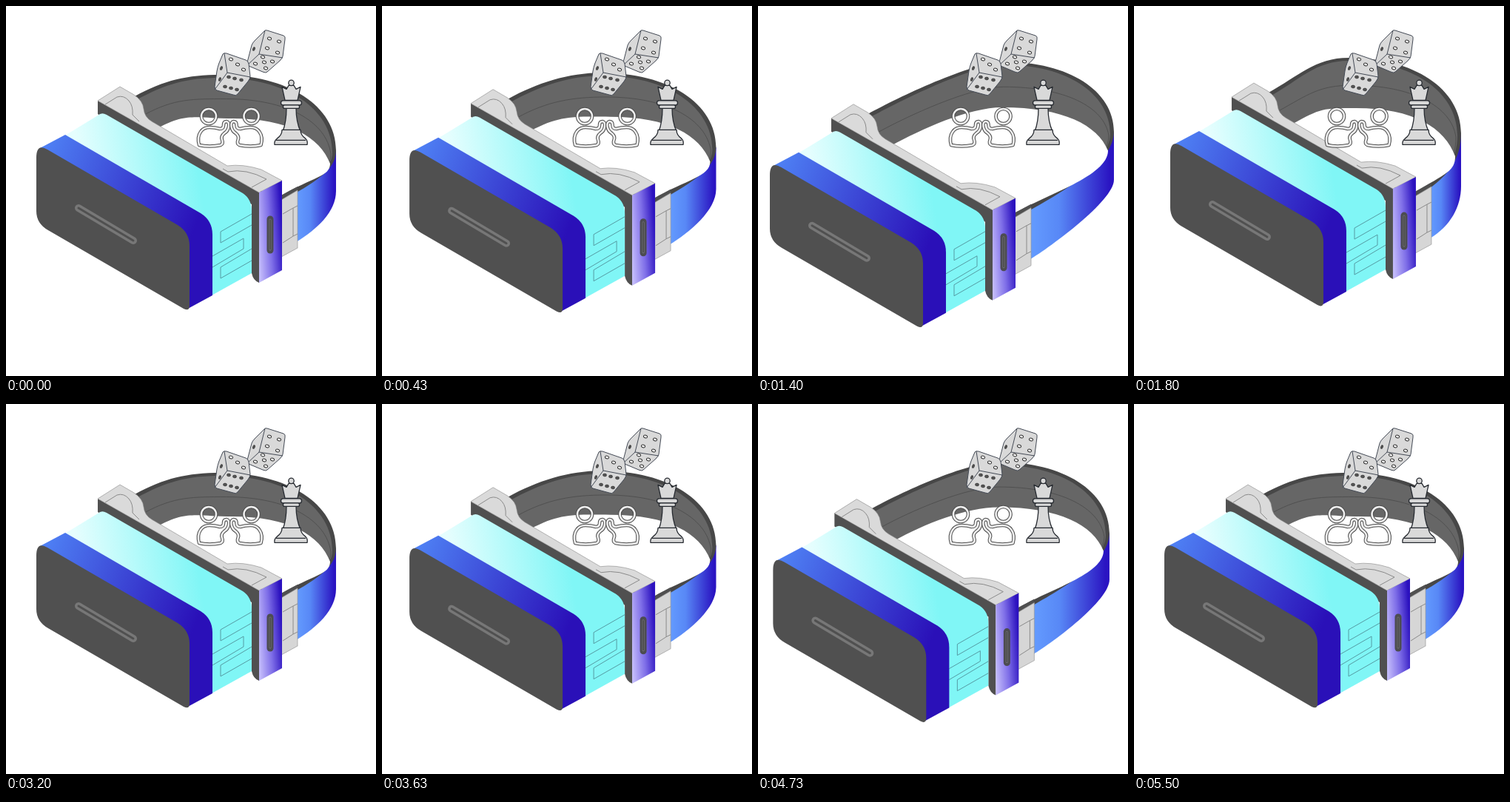
An HTML page for the animation above (6010 ms loop, 500x500 px).

```html
<!DOCTYPE html>
<html lang="en">
<head>
<meta charset="utf-8">
<title>Headset</title>
<style>
html, body { margin: 0; width: 100%; height: 100%; overflow: hidden; background: #fff; }
svg { display: block; width: 100vw; height: 100vh; }
.line { fill: none; stroke: #8a8a8a; stroke-width: 1; }
.body { fill: #d9d9d9; stroke: #444a55; stroke-width: 1; stroke-linejoin: round; }
.queen { stroke: #262a30; stroke-width: 1.3; }
.pip { fill: #fff; stroke: #333; }
.dark { fill: #555; stroke: #444; }
</style>
</head>
<body>
<svg viewBox="0 0 500 500">
  <defs>
    <linearGradient id="band" gradientUnits="userSpaceOnUse" x1="48" y1="190" x2="265" y2="275">
      <stop stop-color="#4f82f5"/><stop offset="1" stop-color="#2a10b8"/>
    </linearGradient>
    <linearGradient id="cyan" gradientUnits="userSpaceOnUse" x1="95" y1="190" x2="250" y2="165">
      <stop stop-color="#e6fefe"/><stop offset="1" stop-color="#80f6f6"/>
    </linearGradient>
    <linearGradient id="side" x1="0" y1=".75" x2="1" y2=".45">
      <stop stop-color="#c2bafa"/><stop offset=".5" stop-color="#7f6fe8"/><stop offset="1" stop-color="#2c12bf"/>
    </linearGradient>
    <linearGradient id="blue">
      <stop stop-color="#649cff"/><stop offset=".35" stop-color="#5888f6"/><stop offset=".95" stop-color="#2a14c2"/>
    </linearGradient>
    <path id="person" d="M261 188Q258 177 263 170Q267 164 275 164Q283 164 289 166Q294 166 294 161Q294 156 298 156Q302 157 301 163Q300 169 295 172Q290 176 292 181Q294 186 290 188Q275 191 261 188ZM284 149A10 10 0 1 1 264 149A10 10 0 1 1 284 149Z"/>
    <g id="figure" fill="none" stroke-linejoin="round">
      <use href="#person" stroke="#4a4a4a" stroke-width="4.6"/>
      <use href="#person" stroke="#eee" stroke-width="2.6"/>
    </g>
  </defs>

  <path id="outer" fill="url(#blue)"/>
  <path id="rim" fill="#474747"/>
  <path id="wall" fill="#666"/>
  <path id="seam" fill="none" stroke="#505050"/>
  <path id="hole" fill="#fff"/>

  <g id="headset">
    <path d="M372 256L394 244V251L372 264Z" fill="#505050"/>
    <path d="M372 262L394 249V327L372 339Z" fill="#d6d6d6" stroke="#999" stroke-width=".7"/>
    <path class="line" d="M374 281L388 273V311L374 320M388 273L394 270M388 311L394 308"/>
    <path d="M124 128L342 252V374Q334 371 332 361V268L124 146Z" fill="#505050"/>
    <path d="M124 128L154 109L173 120Q185 128 186 139Q187 150 197 156L299 216Q320 213 345 221L373 236L342 252Z" fill="#dadada" stroke="#888" stroke-width=".6"/>
    <path class="line" d="M134 133L150 123Q159 120 166 128Q172 135 171 147L180 156M300 224Q324 219 352 234L332 245M293 220L300 224"/>
    <path d="M342 252L373 236V357L342 374Z" fill="url(#side)"/>
    <path d="M357 288V330" fill="none" stroke="#4c4c50" stroke-width="9" stroke-linecap="round"/>
    <path d="M357 289V329" fill="none" stroke="#77777c" stroke-width="3" stroke-linecap="round"/>
    <path d="M357 289V329" fill="none" stroke="#444" stroke-width="1.500" stroke-linecap="round"/>
    <path d="M78 176L124 148Q129 143 136 147L320 253Q332 261 332 277V361L278 391V300Z" fill="url(#cyan)"/>
    <path d="M332 281L290 305V320L332 296M279 338L321 314V328L279 353M332 328L290 353V368L332 344" fill="none" stroke="#559ba3"/>
    <path d="M46 192L80 174L263 280Q279 290 279 309V391L244 410Z" fill="url(#band)"/>
    <path d="M41 205Q41 185 56 194L232 296Q248 306 248 324V405Q248 413 240 409L57 303Q41 294 41 277Z" fill="#505050"/>
    <path d="M98 273L172 317" stroke="#777" stroke-width="10" stroke-linecap="round"/>
    <path d="M98 273L172 317" stroke="#505050" stroke-width="3" stroke-linecap="round"/>
  </g>

  <use href="#figure"/>
  <use href="#figure" transform="translate(605.500) scale(-1 1)"/>

  <g transform="translate(-1)">
    <g class="body">
      <path d="M350 34Q351 32 354 33L376 40Q379 41 378 45L375 68Q374 71 371 74L354 89Q352 91 348 89L329 81Q326 80 327 76L333 53Q334 50 337 47Z"/>
      <path d="M351 33L343 65L327 80M343 65L375 70" fill="none"/>
      <path d="M294 65Q295 63 299 64L325 73Q328 74 329 78L331 95Q331 98 328 102L314 119Q312 122 308 120L286 114Q283 113 283 109L286 88Q287 82 289 77Z"/>
      <path d="M296 64L300 90L283 113M300 90L331 96" fill="none"/>
    </g>
    <g id="pips"></g>
  </g>

  <g class="body queen" transform="translate(0 -.6)">
    <path d="M377 128L373 110L379 113L382 108H389L392 113L398 110L394 128Z"/>
    <circle cx="385.500" cy="104.500" r="3.700"/>
    <path d="M379 138Q379 157 374 170H398Q392 157 392 138Z"/>
    <rect x="371.500" y="128.500" width="28" height="6" rx="3"/>
    <rect x="374.500" y="134.500" width="22" height="4.500" rx="2"/>
    <path d="M373 168H398Q398 175 405 180Q408 183 407 188H363Q362 183 366 180Q373 175 373 168Z"/>
    <path d="M365 182H405" fill="none"/>
  </g>
</svg>
<script>
const $ = id => document.getElementById(id);
const LOOP = 6010, SECOND = 3200;

// Strap shape: rim top, rim right, hole top, hole right, lower edge
const REST = [290, 93, 446, 195, 305, 152, 438, 213, 250];
const LONG = [325, 79, 474, 175, 325, 140, 466, 199, 238];
const TIGHT = [290, 70, 442, 172, 300, 138, 434, 203, 243];

const pips = (list, cls, rx, ry, tilt) => list.forEach(([x, y]) => {
  $('pips').innerHTML += `<ellipse class="${cls}" rx="${rx}" ry="${ry}" transform="translate(${x} ${y}) rotate(${tilt})"/>`;
});
pips([[357, 44], [370, 48], [354, 57], [368, 63], [305, 72], [314, 79], [322, 86]], 'pip', 2.6, 1.8, 15);
pips([[348, 69], [361, 75], [338, 78], [352, 84], [350, 76]], 'pip', 2.6, 1.8, 15);
pips([[302, 96], [310, 98], [319, 100], [297, 109], [305, 111], [313, 113]], 'dark', 2.3, 1.7, 10);
pips([[336, 58], [292, 84], [290, 99]], 'dark', 1.3, 2.4, 20);

const ease = p => {
  p = Math.min(1, Math.max(0, p));
  return p < .5 ? 4 * p ** 3 : 1 - 4 * (1 - p) ** 3;
};

// Pull out, hold, snap past the rest position, settle
const slide = t =>
  -25 * ease(t / 1270) + 33 * ease((t - 1390) / 440) - 8 * ease((t - 1830) / 440);

// Start, top, right and end; lean tilts the curve where it reaches the right
function arc([sx, sy], [tx, ty], [rx, ry], [ex, ey], lean = 0) {
  return `M${sx} ${sy}C${sx + 40} ${sy - 22} ${tx - 45} ${ty} ${tx} ${ty}` +
    `C${tx + .58 * (rx - tx)} ${ty} ${rx - lean} ${ry - .59 * (ry - ty)} ${rx} ${ry}` +
    `C${rx} ${ry + .4 * (ey - ry)} ${ex + 45} ${ey - 26} ${ex} ${ey}`;
}

function draw(now) {
  const t = now % LOOP;
  const u = slide(t < SECOND ? t : t - SECOND);
  const dy = u < 0 ? -.95 * u : -.62 * u;
  const at = (x, y) => [x + u, y + dy];
  const goal = u < 0 ? LONG : TIGHT, k = u < 0 ? -u / 20 : u / 8;
  const [tx, ty, rx, ry, hx, hy, gx, gy, low] = REST.map((v, i) => v + (goal[i] - v) * k);
  const close = `L${at(330, 245)}L${at(200, 170)}Z`;
  const set = (id, d) => $(id).setAttribute('d', d);

  const [ax, ay] = at(392, 319);
  set('outer', `M${rx} ${ry}V${low}C${rx} ${low + 28} ${ax + 28} ${ay - 17} ${ax} ${ay}` +
    `L${at(392, 250)}Z`);
  set('rim', arc(at(174, 122), [tx, ty], [rx, ry], at(372, 264)) + close);
  set('wall', arc(at(176, 127), [tx, ty + 4], [rx - 5, ry + 3], at(370, 258)) + close);
  set('seam', arc(at(187, 147), [(tx + hx) / 2, (ty + hy) / 2 + 3], [rx - 7, ry + 5], at(370, 257), 6));
  set('hole', arc(at(205, 165), [hx, hy], [gx, gy], at(370, 257), 14) + close);
  $('headset').setAttribute('transform', `translate(${u} ${dy})`);
}

const start = performance.now();
(function frame() {
  draw(performance.now() - start);
  requestAnimationFrame(frame);
})();
</script>
</body>
</html>
```
